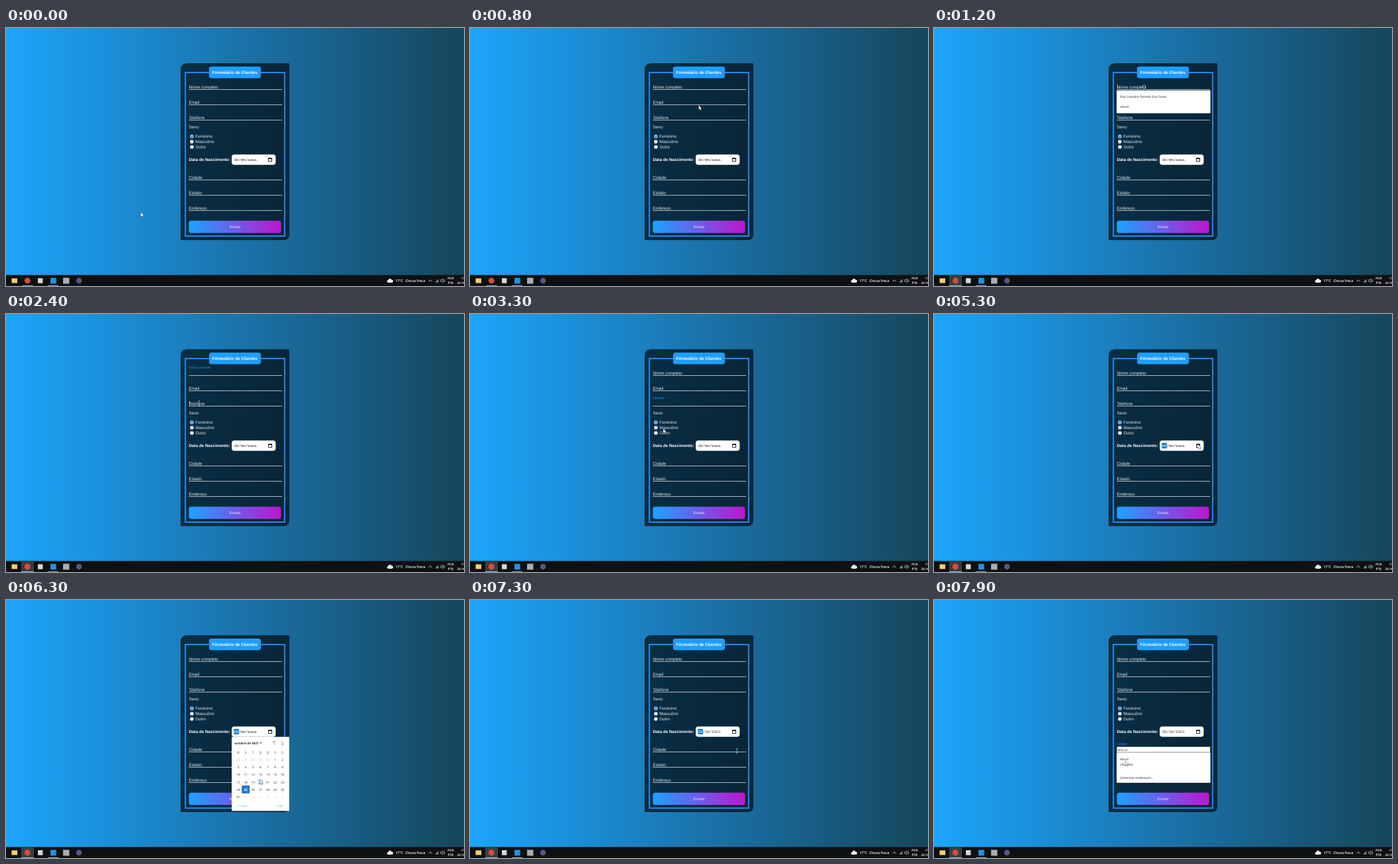
Recreate the animation shown at these times as an HTML page. Size 690x388 px, loop 8000 ms.

```html
<!DOCTYPE html>
<html lang="pt-BR">
<head>
<meta charset="utf-8">
<title>Formulário</title>
<style>
  html, body { margin: 0; width: 100%; height: 100%; overflow: hidden; background: #0f1012; }
  svg { display: block; width: 100vw; height: 100vh; }
  text { font: 6.3px "Liberation Sans", Arial, sans-serif; fill: #e6ebee; text-rendering: geometricPrecision; white-space: pre; }
  .bold { font-weight: bold; fill: #fff; }
  .mono { font: 5.65px "Liberation Mono", monospace; fill: #333; }
  .menu { font: 4.75px "Noto Sans", sans-serif; fill: #333; }
  .cal { font: 4.6px "Noto Sans", sans-serif; fill: #333; text-anchor: middle; }
  .link { fill: #74c2e4; }
  .bar { font: 600 5.3px "Open Sans", sans-serif; fill: #fff; }
  .tiny { font: 600 4.6px "Open Sans", sans-serif; fill: #fff; }
</style>
</head>
<body>
<svg id="stage" viewBox="0 0 690 388" preserveAspectRatio="none">
  <defs>
    <linearGradient id="sky">
      <stop offset="0" stop-color="#1ca5fb"/>
      <stop offset=".5" stop-color="#1a74ac"/>
      <stop offset="1" stop-color="#16465b"/>
    </linearGradient>
    <linearGradient id="send">
      <stop offset="0" stop-color="#1ea2ff"/>
      <stop offset="1" stop-color="#bd16d0"/>
    </linearGradient>
  </defs>
</svg>
<script>
const LOOP = 8000, STEP = 100, FLOAT = 300;
const BLUE = '#1e90ff';
const stage = document.getElementById('stage');

function add(tag, attrs, parent = stage) {
  const el = document.createElementNS('http://www.w3.org/2000/svg', tag);
  for (const k in attrs) el.setAttribute(k, attrs[k]);
  parent.appendChild(el);
  return el;
}
const group = () => add('g', {});
const box = (x, y, width, height, fill, rx = 0, parent) =>
  add('rect', { x, y, width, height, fill, rx }, parent);
const disc = (cx, cy, r, fill, parent) => add('circle', { cx, cy, r, fill }, parent);
const path = (d, attrs, parent) => add('path', { d, fill: 'none', ...attrs }, parent);
function text(x, y, str, cls = '', parent, attrs = {}) {
  const el = add('text', { x, y, class: cls, ...attrs }, parent);
  el.textContent = str;
  return el;
}
const show = (el, on) => el.setAttribute('visibility', on ? 'visible' : 'hidden');
const within = (t, a, b) => t >= a && t < b;

// Page and card
box(0, 0, 690, 388, 'url(#sky)');
path('M273 53H425.5Q427 53 427 54.5V310Q427 319 418 319H264Q263 319 263 318V63Q263 53 273 53Z',
  { fill: '#000', 'fill-opacity': .64 });
add('rect', { x: 270.2, y: 66.9, width: 149.6, height: 246, fill: 'none', stroke: BLUE, 'stroke-width': 1.9 });
box(306, 58, 78, 17.5, '#1e9dff', 3.5);
text(310.5, 69.2, 'Fórmulário de Clientes', 'bold');

// Text fields: label, line position, focus span
const fields = [
  ['Nome completo', 92.5, 1200, 2400],
  ['Email', 115.5],
  ['Telefone', 138.5, 2400, 3400],
  ['Cidade', 228.5, 7500, 1e5],
  ['Estado', 251.5],
  ['Endereço', 274.5]
].map(([name, y, from = 1e6, to = 1e6]) => {
  box(275.5, y - .5, 140.5, 1, '#a9b7bf');
  return { y, from, to, label: text(275.5, y - 1.6, name),
    caret: box(276, y - 7.5, .6, 6.5, '#fff') };
});

// Radios
text(275.5, 151, 'Sexo:');
const dots = ['Feminino', 'Masculino', 'Outro'].map((name, i) => {
  const y = 162.9 + 8 * i;
  disc(280, y, 2.7, '#fff');
  text(285.3, y + 2.4, name);
  const g = group();
  add('circle', { cx: 280, cy: y, r: 2.3, fill: '#fff', stroke: '#1878d8', 'stroke-width': .8 }, g);
  disc(280, y, 1.35, '#1878d8', g);
  return g;
});

// Date input
text(275.5, 200, 'Data de Nascimento:', 'bold');
box(340, 190.2, 66.3, 15.6, '#fff', 4);
const mark = box(343.4, 193.9, 7.4, 8.2, '#0a78d7');
const day = text(343.7, 200, 'dd', 'mono');
const rest = text(350.5, 200, '/mm/aaaa', 'mono');
path('M395.5 196H400.5V200.7H395.5ZM396.6 195V196M399.4 195V196', { stroke: '#111', 'stroke-width': .9 });
box(395.2, 195.6, 5.6, 1.5, '#111');

// Submit button
box(275.5, 289.7, 139, 18.5, 'url(#send)', 3.5);
text(336.8, 301.2, 'Enviar', '', stage, { style: 'font-size:5.9px' });

// Suggestion lists
function list(y, h, items) {
  const g = group();
  box(275.2, y, 141.3, h, '#fff', .8, g);
  for (const [ty, str] of items) text(280.3, ty, str, 'menu', g);
  return g;
}
const names = list(93.8, 34.4, [[105.3, 'Ravi Leandro Portela Das Flores'], [119.7, 'sdasd']]);
const cities = list(229.2, 45.6, [[241.3, 'Mauá'], [249, 'Ubatuba'], [268.6, 'Gerenciar endereços...']]);
const preview = group();
box(275.5, 220.8, 140.5, 7.4, '#fff', 0, preview);
text(276.8, 226.6, 'Mauá', 'menu', preview, { style: 'letter-spacing:.6px' });

// Calendar
const COL = 11.1, ROW = 11.1, X0 = 350, Y0 = 240.5;
const calendar = group();
box(340, 205.8, 86.7, 111.4, '#fff', 0, calendar);
text(344.2, 216.6, 'outubro de 2021', 'menu', calendar, { style: 'font-weight:bold;font-size:4.5px;fill:#222' });
path('M382.6 214.2h3l-1.5 1.8z', { fill: '#222' }, calendar);
path('M404 218V212M401.7 214.3L404 212L406.3 214.3M416.7 212V218M414.4 215.7L416.7 218L419 215.7',
  { stroke: '#777', 'stroke-width': .7 }, calendar);
const hover = box(0, 0, 9, 9, '#cfeafa', 2, calendar);
[...'DSTQQSS'].forEach((c, i) => text(X0 + COL * i, 231, c, 'cal', calendar));
for (let i = 0; i < 42; i++) {
  const n = i - 4, x = X0 + COL * (i % 7), y = Y0 + ROW * Math.floor(i / 7);
  const out = n < 1 || n > 31, today = n === 25;
  if (today) add('rect', { x: x - 5.2, y: y - 5.2, width: 10.4, height: 10.4, fill: '#1482f0',
    stroke: '#123a66', 'stroke-width': .8 }, calendar);
  text(x, y + 1.7, n < 1 ? n + 30 : n > 31 ? n - 31 : n, 'cal', calendar,
    { style: today ? 'fill:#fff;font-weight:bold' : out ? 'fill:#c4c4c4' : '' });
}
text(356.5, 310.6, 'Limpar', 'cal link', calendar);
text(413, 310.6, 'Hoje', 'cal link', calendar);

// Taskbar
box(0, 371.5, 690, 16.5, '#0f1012');
const active = box(23, 371.5, 19, 16.5, '#3a3e41');
const underline = box(0, 387, 16, 1, '#76b9ed');
box(63, 387, 16, 1, '#76b9ed');
box(8.5, 376.5, 8.5, 7, '#f3cf6b');
disc(32.3, 380, 4.4, '#dd4b3c');
box(48, 376.3, 7.4, 7.4, '#d9d9d0');
box(67, 375.8, 8.6, 8.6, '#2a8fdc');
box(86, 375.6, 9.4, 9, '#a9adad');
disc(110, 380, 4.3, '#5a5487');
path('M576 383a2 2 0 0 1 0-4a2.6 2.6 0 0 1 4.8-.6a2.3 2.3 0 0 1 .4 4.6z', { fill: '#eef1f4' });
text(586.7, 382, '17°C', 'bar');
text(601.4, 382, 'Chuva fraca', 'bar');
path('M636.8 381.2L639.2 378.8L641.6 381.2', { stroke: '#fff', 'stroke-width': .8 });
path('M646.5 382.5L651.5 377.5V382.5Z', { fill: '#8e9295' });
path('M654.6 378.8h1.4l1.8-1.7v5.8l-1.8-1.7h-1.4zM659 378.4q1 1.6 0 3.2M660.2 377.3q1.8 2.7 0 5.4',
  { stroke: '#ddd', 'stroke-width': .6 });
text(665.3, 378.2, 'POR', 'tiny');
text(665.6, 385.2, 'PTB', 'tiny');
text(685.6, 378.2, '17:42', 'tiny');
text(679.4, 385.2, '25/10/2021', 'tiny');

// Pointer shapes
const pointer = group();
const shapes = {
  arrow: path('M0 0V7L1.6 5.6L2.7 8L3.8 7.5L2.8 5.2H4.8Z',
    { fill: '#fff', stroke: '#222', 'stroke-width': .4 }, pointer),
  beam: path('M-1.2 -3.4H1.2M0 -3.4V3.4M-1.2 3.4H1.2', { stroke: '#b9c3c9', 'stroke-width': .7 }, pointer),
  ring: add('circle', { cx: 0, cy: .3, r: 2.2, fill: '#0a2b3d', stroke: '#fff', 'stroke-width': .8 }, pointer)
};

// Pointer route: time, x, y
const route = [
  [0, 203, 277], [600, 372, 150], [900, 335, 104], [1100, 316.5, 88], [1700, 316.5, 88],
  [2300, 291, 134], [2800, 291, 134], [3300, 291, 172], [3400, 280, 171], [3700, 279, 178],
  [3900, 279, 178], [4200, 279, 162], [4300, 279, 162], [4800, 348, 197], [5000, 347, 197],
  [5300, 398, 196], [5800, 398, 196], [6300, 382.5, 270], [6700, 382.5, 270],
  [7200, 402, 227], [7500, 402, 227], [7800, 290, 241], [7900, 288, 242]
];
function locate(t) {
  const i = route.findIndex(k => k[0] > t);
  if (i < 0) return route[route.length - 1].slice(1);
  const [t0, x0, y0] = route[i - 1], [t1, x1, y1] = route[i];
  const p = (t - t0) / (t1 - t0), e = p * p * (3 - 2 * p);
  return [x0 + (x1 - x0) * e, y0 + (y1 - y0) * e];
}
const clamp = v => Math.max(0, Math.min(1, v));
const ease = p => 1 - (1 - p) ** 2;

function draw(t) {
  for (const f of fields) {
    const p = t < f.to ? ease(clamp((t - f.from) / FLOAT)) : 1 - ease(clamp((t - f.to) / FLOAT));
    f.label.setAttribute('y', f.y - 1.6 - 9.2 * p);
    f.label.style.fontSize = 6.3 - 1.55 * p + 'px';
    f.label.style.fill = p > 0 ? BLUE : '';
    show(f.caret, within(t, f.from, f.to) && (t - f.from) % 1000 < 500);
  }
  const choice = within(t, 3400, 3800) ? 1 : within(t, 3800, 4200) ? 2 : 0;
  dots.forEach((d, i) => show(d, i === choice));

  const picked = t >= 6500, marked = within(t, 5000, 7500);
  show(mark, marked);
  day.textContent = picked ? '20' : 'dd';
  day.style.fill = marked ? '#fff' : '';
  rest.textContent = picked ? '/10/2021' : '/mm/aaaa';

  const open = within(t, 5400, 6500);
  const [x, y] = locate(t);
  const col = Math.round((x - X0) / COL), row = Math.round((y + 2 - Y0) / ROW);
  show(calendar, open);
  show(hover, open && row >= 0 && row < 6 && col >= 0 && col < 7);
  hover.setAttribute('x', X0 + COL * col - 4.5);
  hover.setAttribute('y', Y0 + ROW * row - 4.5);

  show(names, within(t, 1200, 2400));
  show(cities, t >= 7600);
  show(preview, t >= 7800);

  // The browser window gains focus with the first click
  const focused = t >= 1100;
  show(active, focused);
  underline.setAttribute('x', focused ? 23 : 24.5);
  underline.setAttribute('width', focused ? 19 : 16);

  const kind = within(t, 1100, 1600) ? 'ring'
    : within(t, 1600, 1900) || within(t, 2300, 2900) || within(t, 7200, 7600) ? 'beam' : 'arrow';
  for (const k in shapes) show(shapes[k], k === kind);
  pointer.setAttribute('transform', `translate(${x} ${y})`);
}

const start = performance.now();
function tick() {
  const t = (performance.now() - start) % LOOP;
  draw(Math.floor(t / STEP) * STEP);
  requestAnimationFrame(tick);
}
tick();
</script>
</body>
</html>
```
